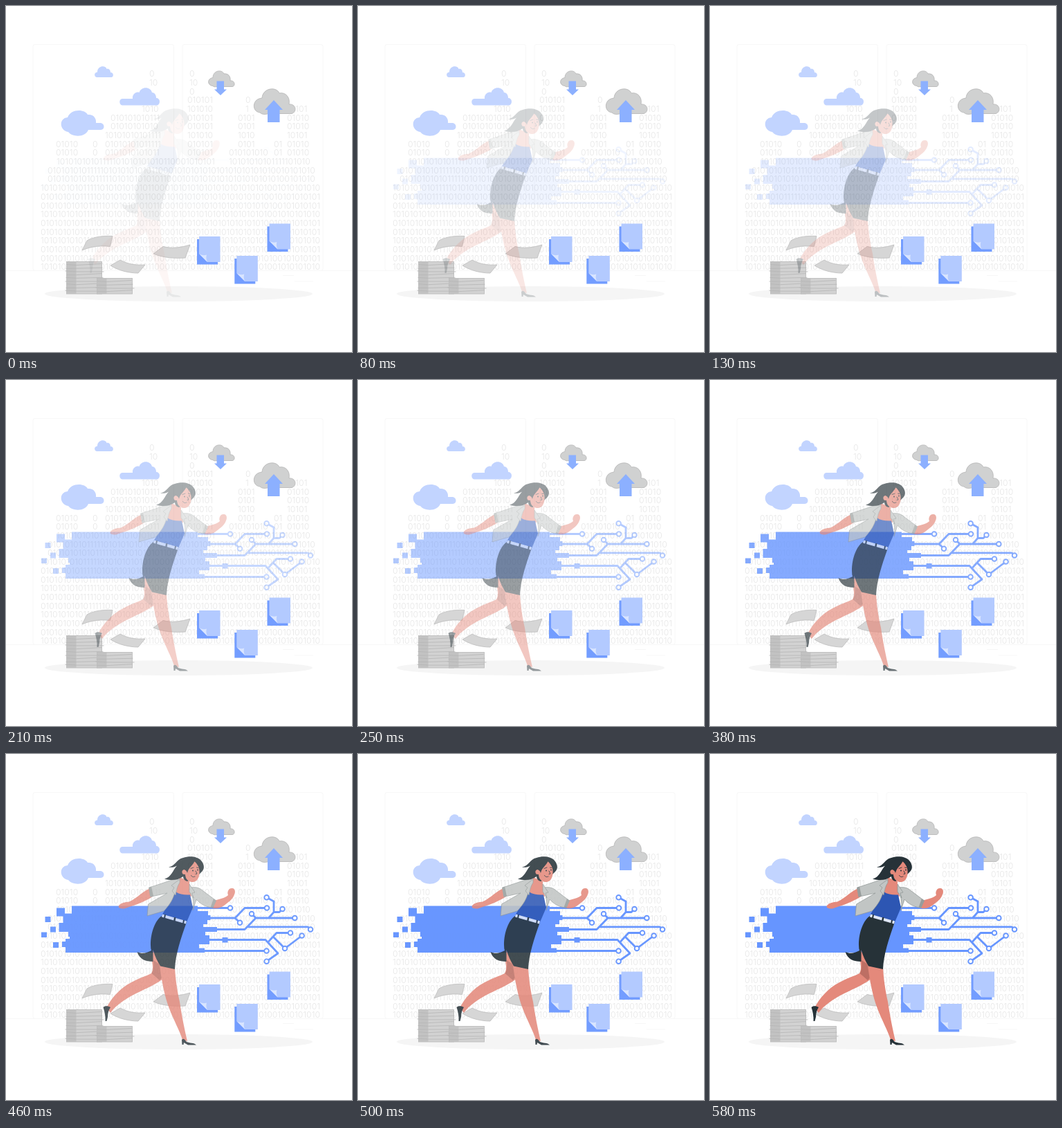
These frames come from a looping animation (500x500 px, 620 ms). An HTML page:

```html
<!DOCTYPE html>
<html lang="en">
<head>
<meta charset="utf-8">
<title>Running through data</title>
<style>
  html, body { margin: 0; width: 100%; height: 100%; overflow: hidden; background: #fff; }
  svg { display: block; width: 100%; height: 100%; }
  #bits { font: 300 12.2px Inter, "Open Sans", sans-serif; fill: #e6e6e6; }
  .skin { fill: #e4897b; }
  .dark { fill: #263238; }
  .coat { fill: #c1c5c4; stroke: #8d9493; stroke-width: .7; stroke-linejoin: round; }
  .cuff { fill: #979d9c; }
  .sheet { fill: #d6d6d6; stroke: #bdbdbd; stroke-width: .8; }
  .grey { fill: #d0d1d1; stroke: #b4b4b4; stroke-width: .8; }
  .sky { fill: #c2d4ff; }
  .arrow { fill: #8cb0ff; }
  .blue { fill: #6695ff; }
  .wire { fill: none; stroke: #6695ff; stroke-width: 2.8; stroke-linejoin: round; }
  .wire path { marker-end: url(#node); }
  .ink { fill: none; stroke: #263238; stroke-width: .9; stroke-linecap: round; }
</style>
</head>
<body>
<svg viewBox="0 0 500 500">
  <defs>
    <g id="doc">
      <path fill="#739dff" d="M276 337h30v36.500h-30z"/>
      <path fill="#b3caff" d="M279 333h30.500v37H291L279 358z"/>
      <path fill="#d9e5ff" d="M279 358L291 370C289 366 289 362 290 359.500C286 361 282 360 279 358z"/>
    </g>
    <marker id="node" markerUnits="userSpaceOnUse" markerWidth="10" markerHeight="10" refX="5" refY="5">
      <circle cx="5" cy="5" r="3.300" fill="#fff" stroke="#6695ff" stroke-width="1.900"/>
    </marker>
  </defs>

  <g fill="none" stroke="#f7f7f7">
    <rect x="39" y="55.500" width="203.500" height="327" rx="3"/>
    <rect x="255" y="55.500" width="203" height="327" rx="3"/>
    <path d="M0 382.500H500M400 389.500h16M417 398h27"/>
  </g>
  <g id="bits"></g>

  <g class="sky">
    <path d="M131 103C127 102 127 96 132 95.500C132 86 144 85 145.500 91C149 90 151 93 151 96C156 96 156 103 152 103z"/>
    <path d="M168 143.500C163 143 163 134 168 134H183C182 128 188 123 192.500 125C195 116 209 116 211 125C215 125 217 129 217 133C224 133 223 143.500 218 143.500z"/>
    <path d="M90 182C77 180 76 162 89 161C94 148 114 149 118 157C126 156 131 162 130 169H137C143 170 143 179 137 179H119C115 190 96 190 90 182z"/>
  </g>
  <g class="grey">
    <path d="M299 115.500C291 115 290 105 299 103.500C299 93 312 91 315 98C321 97 325 102 324 108C331 107 332 116 327 116.500H304C302 117 300 117 299 115.500z"/>
    <path d="M367 154C355 153 355 134 370 133C371 118 391 116 395 126C404 124 411 132 409 142C419 141 421 153 413 155.500H379C375 157 370 157 367 154z"/>
  </g>
  <path class="arrow" d="M304.500 108.500H315V120.500H319L310 129L301 120.500H304.500z"/>
  <path class="arrow" d="M378 168V150H374L387 136L400 150H395.500V168z"/>

  <ellipse cx="249.500" cy="416" rx="193.500" ry="11" fill="#f5f5f5"/>
  <use href="#doc"/>
  <use href="#doc" x="54.300" y="28"/>
  <use href="#doc" x="101.500" y="-18.500"/>
  <g id="piles"></g>
  <g class="sheet">
    <path d="M110 353L117 339C128 333 140 332 154 332.500L150.500 347.500C138 346 124 347 110 353z"/>
    <path d="M151 375L165 367C176 373 188 375 201 374L191 386C177 386 162 382 151 375z"/>
    <path d="M213 358L227 347.500C240 351 253 349 266 345L259 364C244 365 227 364 213 358z"/>
  </g>

  <g id="beam">
    <path class="blue" d="M95 219.500H277V227H292V233H295.500V240H291V246H285V250H305V257H288V262H294V275H279V280.500H287V287H86V279H81V271H86V267H92V264H90V257H76.500V244H82.500V230.500H95z"/>
    <path class="blue" d="M73 222.500h12v12h-12zM56.500 235h8v8h-8zM64 249.500h8v8h-8zM51 257.500h8v7.500h-8zM68 272h8v8h-8zM312.500 265h8v7.500h-8z"/>
    <g class="wire">
      <path d="M277 222.500H324"/>
      <path d="M294 237H331L345 222.500H377"/>
      <path d="M331 237L338 243.800"/>
      <path d="M304 253.500H345L361 237H417.300"/>
      <path d="M361 237L355 231"/>
      <path d="M349 249.800H436L440 253.500"/>
      <path d="M380 236.500L387 228.500V213L376.600 207.300"/>
      <path d="M387 228.500H395L399.500 224"/>
      <path d="M294 268.500H375L393 288L376.600 299.700"/>
      <path d="M379 271.500L391 258.500H411"/>
      <path d="M403 281L427.600 262.500"/>
      <path d="M386 264L403 281"/>
      <path d="M287 284.500H376.500"/>
    </g>
  </g>

  <g id="runner">
    <!-- rear leg -->
    <path class="skin" d="M218 284L231 304L236 322C224 333 208 339 194 346C178 354 165 363 157 374L151 367C158 353 170 339 187 330C198 324 208 321 216 317C219 312 218 305 217 300z"/>
    <path fill="#bd6f64" d="M219 298L231 306L232 322L228 327L216.500 317C219.500 312 219.500 306 219 298z"/>
    <path class="dark" d="M146.500 366C149 363.500 153 363.500 157 366C154.500 370 153 374 153 380L151.500 386H149.500C150 379 148.500 372 146.500 366z"/>
    <!-- front leg -->
    <path class="skin" d="M219 283L234 300L250 309C251 325 253 340 257 358C260 378 264 398 268 415L261 413C257 400 248 384 242 368C235 350 231 328 228 306z"/>
    <path class="dark" d="M260 413C262 410.500 264 412 267 416C271 418 278 417 281 420.500H269L263 417L262.500 420H260.500z"/>
    <!-- skirt -->
    <path class="dark" d="M231 234C222 240 215 257 215 276Q215 281 216 284C209 288 202 289 195.500 286C199 297 208 300 218.500 300L218.500 283C221 292 225 300 229 306.500L250 311C251 290 258 268 267 243z"/>
    <!-- top and belt -->
    <path class="skin" d="M257 178L271 184V191L274 206L251 202L255 186z"/>
    <path fill="#2d56b3" d="M251 199C257 203 264 204 272 203.500L276 222L267 243L231 233L239 220z"/>
    <path fill="#dfe7f8" d="M232 231.500L267 241.500L266 245.500L231 235.500z"/>
    <path class="dark" d="M235 232h2l-1 5.500h-2zM249 236h2.500l-1 5.500h-2.500zM262 240h2l-1 5.500h-2z"/>
    <!-- arms and jacket -->
    <path class="skin" d="M215 194C205 197 196 208 184 213.500C178 214 172 215 169 219C167 223 173 224 177 223.500L187 220C198 217 210 211 218 206z"/>
    <path class="skin" d="M307 212C315 209 321 209 327 204C325 199 328 194 332 194C337 193 338 199 336 203C334 209 329 213 325 216C318 222 311 225 303 222z"/>
    <path class="coat" d="M273 193C279 192 284 193 287 195L309 211.500L303 222C295 221 287 217 281 210L276 226C278 214 276 204 271 195z"/>
    <path class="cuff" d="M306 209L310 212L305 223L301.500 221.500z"/>
    <path class="coat" d="M257 181C250 181 245 182 240 184L213 193L216.500 206L239 201L211.500 217L210 234L234 227C243 218 248 208 250 200z"/>
    <path class="coat" d="M257 181L245 190L249 193L246 198L251 204C252 197 254 190 257 186z"/>
    <path class="coat" d="M271 188L279 200L275 201L277 208L271 199z"/>
    <path class="cuff" d="M212 193L216 191.500L219 205.500L214.500 207z"/>
    <!-- head -->
    <path class="dark" d="M235 180.500C245 178 247 168 253 161.500C249 164 245 164 241 163.500C251 162 252 152 262 150C271 147 283 148 288 154C293 160 293 166 289 170L283 176L268 184C264 183 262 180 262 177C254 183 244 183 235 180.500z"/>
    <path class="skin" d="M265 175C265 161 270 155 278 155C284 158 286 166 285.500 173C285 180 281 185 276 185C272 185 268 183 266 179z"/>
    <circle class="skin" cx="264" cy="170.500" r="3.600"/>
    <path class="dark" d="M259 167C259 156 268 150 279 153.500C277 161 270 163 268 172C267 168 264 166 259 167z"/>
    <path class="dark" d="M275 153C282 157 285 163 287 170C293 163 289 154 281 151z"/>
    <circle class="dark" cx="276" cy="168.500" r="1"/>
    <circle class="dark" cx="283" cy="167.500" r="1"/>
    <path class="ink" d="M273 165.500L277 164M281.500 164L284 164.500M273.500 175.500C275 178 277 178 279 177"/>
    <path class="ink" stroke="#b9564b" d="M280 169L282 173L280 173.500"/>
  </g>
</svg>

<script>
const $ = id => document.getElementById(id);
const add = (parent, tag, attrs, text = "") => {
  const el = document.createElementNS("http://www.w3.org/2000/svg", tag);
  for (const key in attrs) el.setAttribute(key, attrs[key]);
  el.textContent = text;
  parent.append(el);
};

// Binary wall: towers of digits standing on full-width lines
const pen = document.createElement("canvas").getContext("2d");
pen.font = '300 12.2px Inter, "Open Sans", sans-serif';
const pattern = "01".repeat(6) + "1111" + "01".repeat(6) + "1000" + "10".repeat(12);
const line = (x, width, row) => {
  let s = "";
  for (let i = row % 3; pen.measureText(s).width < width - 3; i++) s += pattern[i % pattern.length];
  add($("bits"), "text", { x, y: 102.3 + 12.68 * row }, s);
};
const tower = (x, width, top, bottom = 9) => {
  for (let row = top; row <= bottom; row++) line(x, width, row);
};
tower(207, 8, 0, 1);
tower(265, 8, 0, 2);
tower(196, 26, 4, 4);
tower(151, 72, 5, 6);
tower(143, 80, 7);
tower(72, 31, 8);
tower(125, 6, 8);
tower(262, 37, 3);
tower(346, 6, 3, 4);
tower(335, 26, 5, 8);
tower(387, 13, 8);
tower(406, 29, 4);
tower(322, 56, 9);
tower(73, 227, 10, 10);
tower(322, 115, 10, 10);
tower(60, 388, 11, 12);
tower(50, 403, 13, 22);

// Paper piles
const pile = (x, top, width) => {
  const g = $("piles"), height = 416 - top;
  add(g, "rect", { x, y: top, width, height, fill: "#d2d2d2", stroke: "#b8b8b8", "stroke-width": .8 });
  add(g, "rect", { x, y: top, width: 14, height, fill: "#c2c2c2" });
  for (let y = top + 4, i = 0; y < 414; y += 4.7, i++) {
    const left = x - i % 3, right = x + width + (i * 2) % 5 - 1;
    add(g, "path", {
      d: `M${left} ${y + i % 2}L${x + 14} ${y + 1}L${right} ${y - 1 + i % 3}`,
      fill: "none", stroke: "#b5b5b5", "stroke-width": .8
    });
  }
};
pile(87.5, 369.5, 51);
pile(131.5, 393.5, 51);

// Stepped motion on a grid of 10 ms
const loop = 620, steps = 15;
const start = k => Math.round(k * loop / steps / 10) * 10;
const smooth = u => u * u * (3 - 2 * u);
const play = (id, pose) => {
  const frames = Array.from({ length: steps }, (_, k) =>
    ({ offset: start(k) / loop, easing: "step-end", ...pose(k) }));
  frames.push({ offset: 1, ...pose(steps - 1) });
  $(id).animate(frames, { duration: loop, iterations: Infinity }).startTime = 0;
};
play("runner", k => ({ opacity: (k + 1) / steps, transform: `translateX(${2 * k - 28}px)` }));
play("beam", k => ({ opacity: smooth(Math.min(1, (k + .7) / 13.7)) }));
</script>
</body>
</html>
```
